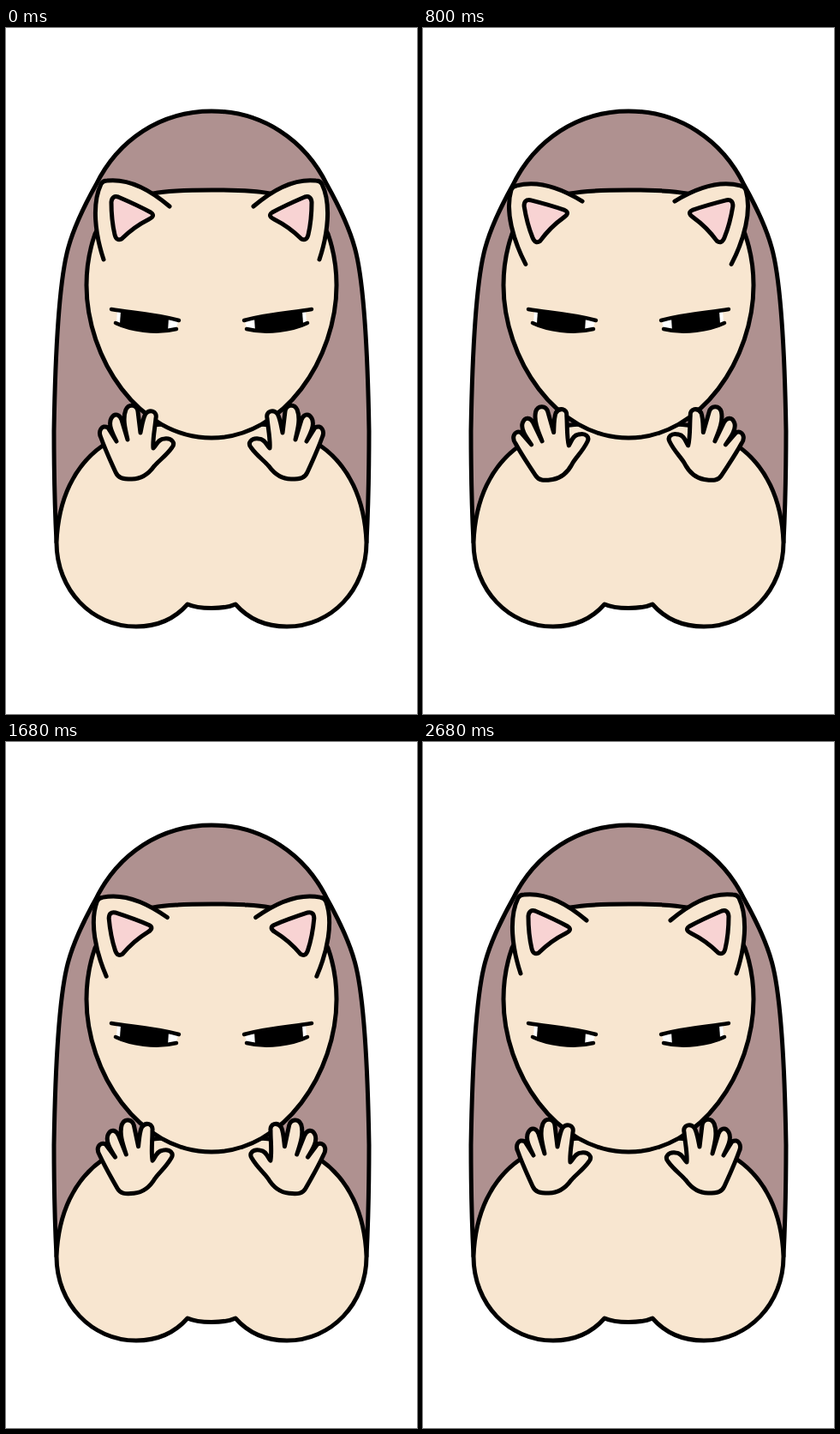
Animation of 480x800 px, one loop 4 s. Source, as an HTML page:

```html
<!DOCTYPE html>
<html lang="en">
<head>
<meta charset="utf-8">
<title>Waving cat</title>
<style>
  html, body { margin: 0; width: 100%; height: 100%; overflow: hidden; background: #fff; }
  svg { display: block; width: 100vw; height: 100vh; }
  path { stroke: #000; stroke-width: 5; stroke-linecap: round; stroke-linejoin: round; }
  .skin { fill: #f8e6d0; }
  .hair { fill: #af9190; }
  .pink { fill: #f8d3d3; }
  .line { fill: none; stroke-width: 4.5; }
  .bare { stroke: none; }
</style>
</head>
<body>
<svg viewBox="0 0 480 800">
  <defs>
    <g id="eye">
      <path class="bare" fill="#fff" d="M130 330 L201 341 L199 350 Q160 356 129 344 Z"/>
      <path class="bare" d="M134 330 C152 330 175 333 190 338 L189 354 C170 356 150 353 133 345 Z"/>
      <path class="line" d="M123 328 C145 332 172 333 202 341"/>
      <path class="line" d="M128 344 C145 352 175 357 199 351"/>
    </g>
    <g id="ear">
      <path class="skin" d="M114 270 C104 240 100 205 111 182 Q113 178 118 178 C145 175 170 190 191 208"/>
      <path class="pink" d="M131 197 C145 203 158 209 169 215 Q175 219 167 223 C155 229 144 237 135 246 Q129 249 127 241 C124 228 123 215 123 203 Q124 195 131 197 Z"/>
    </g>
    <path id="hand" class="skin" d="M128 518 C122 505 116 492 111 478 C107 470 112 462 119 466 L129 482
      C124 472 119 462 123 455 C127 448 133 451 135 457 L142 480
      C139 467 136 455 140 445 C144 437 153 440 154 447 L157 472
      C159 462 160 455 163 450 C168 444 177 447 175 455 C174 467 171 480 172 490
      C176 486 178 479 185 479 C194 478 198 484 194 489
      C187 499 179 504 173 511 C165 522 157 526 147 526 C136 526 131 525 128 518 Z"/>
    <g id="limbs">
      <use href="#eye"/>
      <use href="#ear"/>
      <use href="#hand"/>
    </g>
  </defs>

  <path class="hair" d="M59 600 C57 560 56 515 56 470 C57 410 60 310 71 263 C77 237 91 208 105 183 C131 130 181 97 240 97
    C299 97 349 130 375 183 C389 208 403 237 409 263 C420 310 423 410 424 470 C424 515 423 560 421 600"/>
  <path class="skin" d="M186 462 C160 462 135 472 113 487 C80 510 61 549 59 600 C59 655 100 698 152 698
    C178 698 198 688 212 672 C225 678 255 678 268 672 C282 688 302 698 328 698
    C380 698 421 655 421 600 C419 549 400 510 367 487 C345 472 320 462 294 462"/>
  <path class="skin" d="M240 189 C205 189 182 191 172 193 C146 199 115 215 104 240 C97 260 94 280 94 300
    C94 385 155 478 240 478 C325 478 386 385 386 300 C386 280 383 260 376 240
    C365 215 334 199 308 193 C298 191 275 189 240 189 Z"/>
  <use href="#limbs"/>
  <use href="#limbs" transform="matrix(-1 0 0 1 480 0)"/>
</svg>
<script>
  const LOOP = 4000, STEP = 40, SWING = 1340, MOVING = 2 * SWING, ANGLE = 10;
  const parts = [["ear", 151, 236], ["hand", 152, 499]].map(([id, x, y]) =>
    ({ el: document.getElementById(id), x, y }));

  // Two smooth swings, then a rest.
  function angleAt(ms) {
    const t = Math.min(Math.floor(ms / STEP) * STEP, MOVING);
    return -ANGLE * (1 - Math.cos(2 * Math.PI * t / SWING)) / 2;
  }

  function draw() {
    const a = angleAt(performance.now() % LOOP);
    for (const { el, x, y } of parts) el.setAttribute("transform", `rotate(${a} ${x} ${y})`);
    requestAnimationFrame(draw);
  }
  draw();
</script>
</body>
</html>
```
